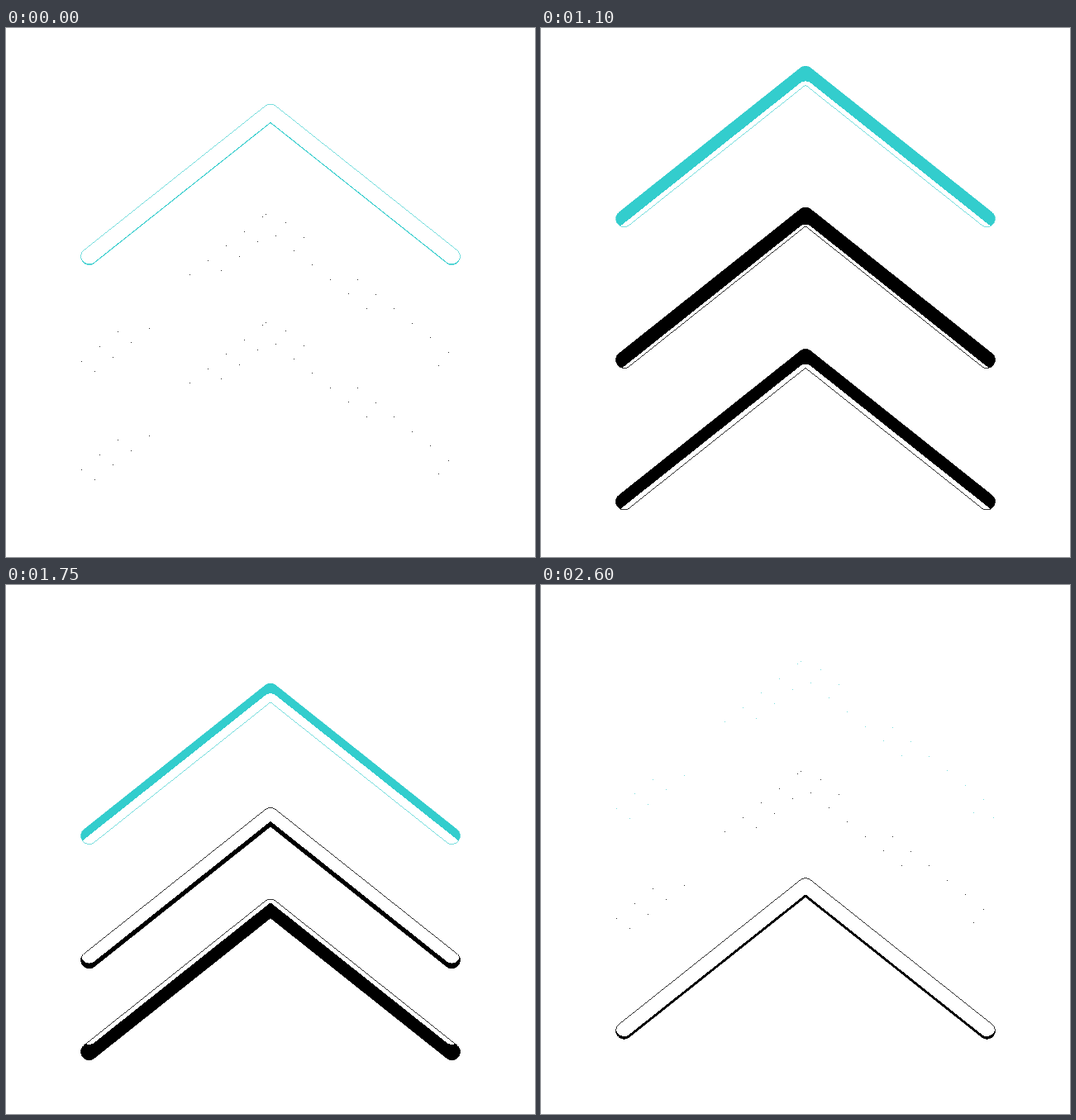
These frames come from a looping animation (640 px wide and 640 px high, 2.65 s). An HTML page without scripts:

```html
<!DOCTYPE html>
<html lang="en">
<head>
<meta charset="utf-8">
<title>Bouncing chevrons</title>
<style>
  @property --t {
    syntax: "<number>";
    inherits: false;
    initial-value: 0;
  }

  html, body {
    margin: 0;
    width: 100%;
    height: 100%;
    overflow: hidden;
    background: #fff;
  }

  svg {
    display: block;
    width: 100%;
    height: 100%;
    shape-rendering: crispEdges;
  }

  /* --t is the local time in ms, held for 50 ms per step */
  @keyframes clock {
    from { --t: -100; }
    to { --t: 2550; }
  }

  use {
    --late: 0;
    animation: clock 2650ms steps(53) infinite;
    animation-delay: calc((var(--lag) + var(--late)) * 1ms - 2751ms);

    /* progress of each swing */
    --a: clamp(0, (var(--t) + 50) / 760, 1);
    --b: clamp(0, (var(--t) - 690) / 570, 1);
    --c: clamp(0, (var(--t) - 1240) / 420, 1);
    --d: clamp(0, (var(--t) - 1640) / 420, 1);
    --e: clamp(0, (var(--t) - 2045) / 355, 1);

    /* eased swings, added up */
    translate: 0 calc(1px * (
        82 * var(--a) * var(--a) * (3 - 2 * var(--a))
      - 157 * var(--b) * var(--b) * (3 - 2 * var(--b))
      + 121 * var(--c) * var(--c) * (3 - 2 * var(--c))
      - 106 * var(--d) * var(--d) * (3 - 2 * var(--d))
      + 60 * var(--e) * var(--e) * (3 - 2 * var(--e))));
  }

  .solid { fill: var(--ink); }

  /* hides what the chevron covered one step earlier */
  .trail { --late: 50; fill: #fff; }

  /* solid line in motion, scattered dots at rest */
  .edge {
    --moving: clamp(0, (var(--t) + 50) / 50, 1) * clamp(0, (2450 - var(--t)) / 50, 1);
    fill: none;
    stroke: var(--ink);
    stroke-width: var(--line);
    stroke-dasharray: 1px calc((1 - var(--moving)) * 27px);
  }

  .top { --lag: 0; --ink: #33cdcd; --line: .65px; }
  .middle { --lag: 100; --ink: #000; --line: .8px; }
  .bottom { --lag: 200; --ink: #000; --line: .8px; }
</style>
</head>
<body>
<svg viewBox="0 0 640 640">
  <defs>
    <path id="chevron" d="M-6.2-7.8A10 10 0 0 1 6.2-7.8L226.2 167.2A10 10 0 0 1 213.8 182.8L0 12.8L-213.8 182.8A10 10 0 0 1-226.2 167.2Z"/>
  </defs>
  <g class="top" transform="translate(320 101)">
    <use class="solid" href="#chevron"/>
    <use class="trail" href="#chevron"/>
    <use class="edge" href="#chevron"/>
  </g>
  <g class="middle" transform="translate(320 233.8)">
    <use class="solid" href="#chevron"/>
    <use class="trail" href="#chevron"/>
    <use class="edge" href="#chevron"/>
  </g>
  <g class="bottom" transform="translate(320 364.7)">
    <use class="solid" href="#chevron"/>
    <use class="trail" href="#chevron"/>
    <use class="edge" href="#chevron"/>
  </g>
</svg>
</body>
</html>
```
